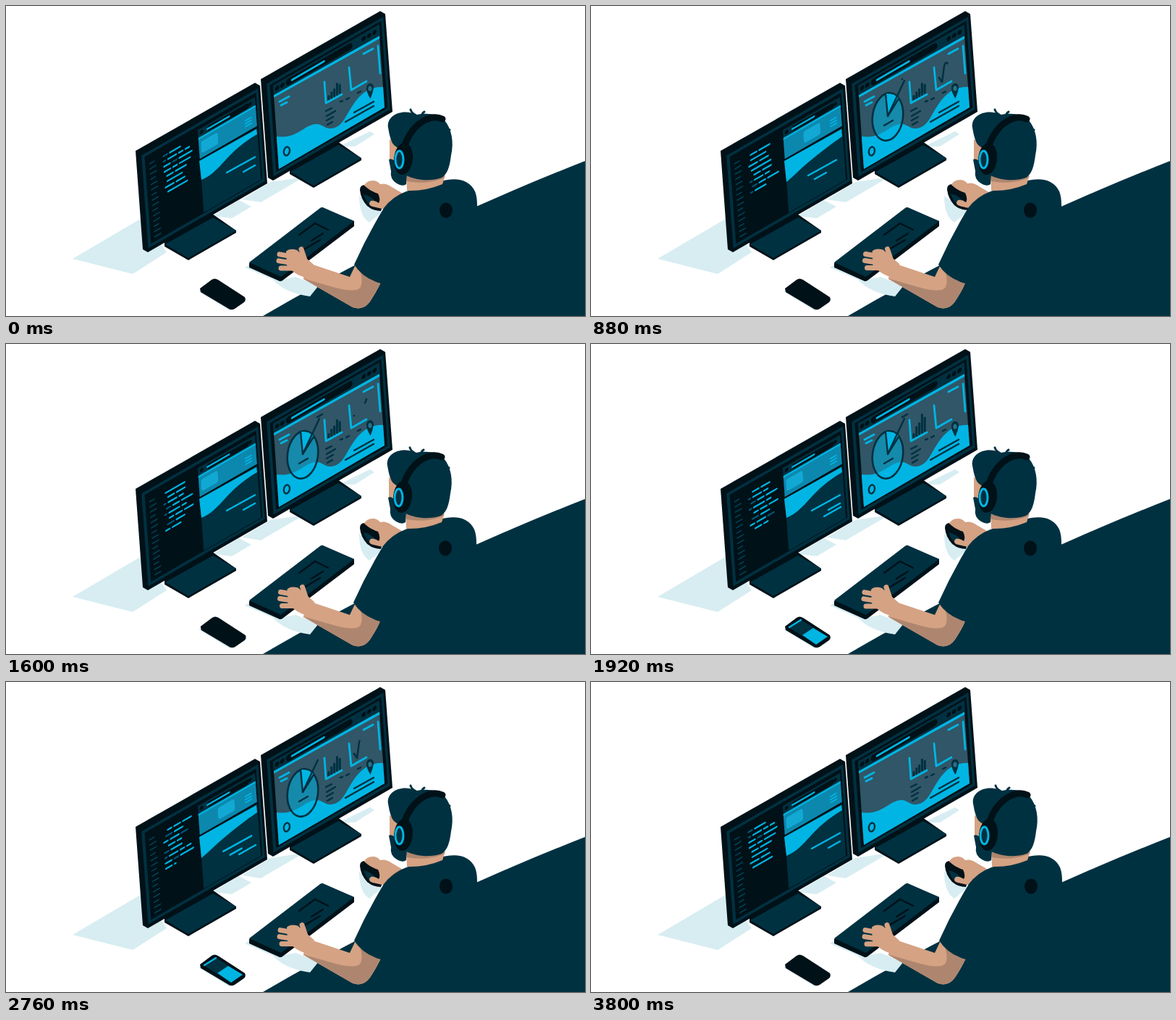
Recreate the animation shown at these times as an HTML page. Size 800x428 px, loop 3.84 s.

```html
<!DOCTYPE html>
<html lang="en">
<head>
<meta charset="utf-8">
<title>Developer at a desk</title>
<style>
  html, body { margin: 0; width: 100%; height: 100%; overflow: hidden; background: #fff; }
  svg { display: block; width: 800px; height: 428px; }
  .ink { fill: #001118; }
  .navy { fill: #003141; }
  .cyan { fill: #00b5e3; }
  .blue { fill: #0c88ae; }
  .pale { fill: #d7edf2; }
  .skin { fill: #d5a283; }
  .shade { fill: #ae866f; }
  .line { fill: none; stroke-linecap: round; stroke-linejoin: round; stroke-width: 2.4; }
  .s-ink { stroke: #001118; }
  .s-navy { stroke: #003141; }
  .s-cyan { stroke: #00b5e3; }
  .s-dim { stroke: #00597a; }
  .s-skin { stroke: #d5a283; }
</style>
</head>
<body>
<svg viewBox="0 0 800 428">
  <defs>
    <g id="monitor">
      <path class="ink" d="M-7-4 158-98 165-94 175 41 10 136 3 132Z"/>
      <g transform="matrix(1 -.575 .0735 1 0 0)">
        <path class="navy" d="M1 3H162V131H1Z"/>
        <path class="ink" d="M5 7H159V127H5Z"/>
      </g>
    </g>
    <g id="stand">
      <path class="ink" d="M0 34 66-4 99 19V22L33 60 0 41Z"/>
      <path class="navy" d="M1 38 67 1 99 19 33 57Z"/>
    </g>
    <clipPath id="screen"><path d="M370 123 516 41 523 140 377 225Z"/></clipPath>
    <clipPath id="editor"><path d="M24 15H77V82H24Z"/></clipPath>
  </defs>

  <path class="navy" d="M355 428Q560 308 800 214V428Z"/>
  <path class="pale" d="M92 349 189 292 222 340 175 370ZM285 290 322 268 339 277 312 293ZM326 267 365 243 412 236 352 271ZM460 194 503 173 509 177 482 194Z"/>
  <path class="pale" d="M330 361 350 349 380 378 400 374 432 386 420 401Q385 396 369 378ZM488 262Q488 290 502 299L520 284ZM266 394 276 389 314 419 308 420Z"/>

  <!-- Right monitor -->
  <use href="#stand" x="392" y="191"/>
  <use href="#monitor" x="359" y="105"/>
  <g transform="matrix(1 -.575 .0735 1 359 105)">
    <path class="navy" d="M9 10H156V25H9Z"/>
    <path class="line s-ink" style="stroke-width:9" d="M31 17H114"/>
    <path class="line s-cyan" style="stroke-width:3" d="M35 17H79"/>
    <path class="line s-ink" style="stroke-width:6" d="M14.500 16.500v.1M21.500 16.500v.1M134 17v.1M141.500 17v.1M149 17v.1"/>
  </g>
  <g clip-path="url(#screen)">
    <path fill="#305667" d="M360 0H530V240H360Z"/>
    <path class="cyan" d="M368 179C403 187 412 161 431 163C439 165 442 170 450 169C457 168 463 164 469 154C478 139 486 122 503 115Q512 111 525 112V150L370 240Z"/>
    <path class="line s-cyan" style="stroke-width:3.500" d="M369 125 518 42"/>
  </g>
  <path class="line s-cyan" style="stroke-width:2.800" d="M378 132 391 125M380 137 388 133M440 105 442 134 464 122M474 85 477 116 498 104M494 66 507 59M514 55 517 93"/>
  <path class="line s-navy" d="M442 145 450 141M443 152 455 145M443 158 452 153M444 164 451 160M462 132 465 131M470 129 474 127M486 120 490 118M469 160 508 138M481 147 508 132"/>
  <ellipse class="line s-navy" cx="388" cy="200.500" rx="4" ry="6" transform="rotate(12 388 200)"/>
  <path id="bars" class="line s-navy" style="stroke-width:3"/>
  <path id="spark" class="line s-navy" pathLength="100" d="M481 99 485 105 488 83Q490 75 493 80T498 76"/>
  <g id="pin">
    <path class="navy" d="M498 115C497 105 508 104 508 113Q507 120 503.500 128Q499 121 498 115Z"/>
    <ellipse cx="503" cy="114" rx="2.600" ry="3.500" fill="#2b7089"/>
  </g>
  <g id="pie">
    <ellipse class="cyan s-navy" fill-opacity=".55" stroke-width="2.600" rx="21" ry="33" transform="rotate(8)"/>
    <path class="cyan" d="M0-1-3-32Q8-33 15-26Z"/>
    <path class="line s-navy" d="M-3-32 0-1 15-25M-5 12 7 5"/>
  </g>
  <path id="pointer" class="line s-navy" pathLength="100" d="M410 152 433 103"/>
  <path id="label" class="line s-navy" pathLength="100" d="M430 101 437 97"/>

  <!-- Left monitor -->
  <use href="#stand" x="219" y="291"/>
  <use href="#monitor" x="186" y="204"/>
  <g transform="matrix(1 -.575 .0735 1 186 204)">
    <path id="numbers" class="line" style="stroke-width:2" stroke="#003d50"/>
    <g clip-path="url(#editor)">
      <path id="dim" class="line s-dim"/>
      <path id="code" class="line s-cyan"/>
    </g>
    <path class="navy" d="M78 12H157V126H78Z"/>
    <path class="line s-ink" style="stroke-width:7" d="M94 18H145"/>
    <path class="line s-ink" style="stroke-width:5" d="M83 17.500v.1M150 17.500v.1"/>
    <path class="line s-cyan" d="M91 18H121"/>
    <path class="blue" d="M78 24H157V52H78Z"/>
    <path class="cyan" d="M78 23H157V25.500H78Z"/>
    <rect id="card" x="81" y="30" width="23" height="16" rx="3" fill="#12a8d4"/>
    <path class="line s-cyan" style="stroke-width:1.800" d="M142 36H150M142 40H150M142 44H150"/>
    <path class="ink" d="M78 52H157V54.500H78Z"/>
  </g>
  <path id="hero" class="cyan"/>
  <path id="copy" class="line s-cyan"/>

  <!-- Keyboard and phone -->
  <path class="ink" d="M336 355 436 278 481 297V304L382 379Q379 381 376 379L336 361Z"/>
  <path class="navy" d="M336 354 434 279Q437 277 440 279L481 297 380 374Z"/>
  <path class="line s-ink" d="M405 316 427 300 445 309M422 324 438 314M412 336 434 323"/>
  <g id="phone">
    <path class="ink" d="M268 390 284 378Q288 375 293 378L330 402Q332 406 329 409L316 418Q311 421 306 417L269 395Z"/>
    <g id="display">
      <path class="navy" d="M273 391 289 380 308 392 292 403Z"/>
      <path class="line s-cyan" d="M274 391 290 381"/>
      <path class="cyan" d="M292 402 307 392 327 404 311 415Z"/>
    </g>
  </g>

  <!-- Mouse and right hand -->
  <g id="mouse">
    <path class="ink" d="M489 254Q489 247 496 247L517 256 522 272 518 283Q507 283 499 276Q490 266 489 254Z"/>
    <path class="navy" d="M494 260Q504 262 511 270L504 276Q497 270 494 260Z"/>
    <path class="skin" d="M495 248Q498 241 507 241Q513 241 517 246Q525 244 533 250L552 261 532 286 520 280Q509 278 504 276Q500 273 504 269Q510 268 515 272Q518 267 514 259Q505 256 500 252Z"/>
  </g>

  <!-- Left arm -->
  <g id="hand">
    <path class="skin" d="M387 339Q392 334 402 337L425 357 418 376Q404 373 396 366L388 358Z"/>
    <path class="line s-skin" style="stroke-width:7" d="M378 343 395 346M377 352 396 355M380 362 398 362M408 336 414 354"/>
  </g>
  <path class="skin" d="M414 352 424 357 475 374 484 355 520 378Q510 398 503 408Q494 421 479 416L411 377Z"/>
  <path class="shade" d="M410 376 452 388Q484 397 490 388Q494 378 488 363L520 378 503 408Q494 421 479 416Z"/>

  <!-- Torso and head -->
  <g id="body">
    <path class="navy" d="M481 357Q499 317 522 279Q534 263 553 256L604 241Q637 234 648 256Q651 263 651 276L690 428H500L518 383Q493 376 481 357Z"/>
    <path class="skin" d="M553 230 607 234 603 246Q579 256 554 255Z"/>
    <path class="shade" d="M553 234 606 235 604 238Q580 247 554 242Z"/>
    <ellipse class="ink" cx="608" cy="282" rx="9" ry="10.500"/>
    <path class="skin" d="M530 184 546 194 541 216 530 213Z"/>
    <path class="navy" d="M529 212Q533 210 537 214L554 230 553 246Q548 250 540 245Q530 239 532 228Z"/>
    <path class="navy" d="M528 168C526 155 538 146 553 146.500Q562 147 568 150C580 147 600 149 606 158C616 170 619 188 615 206C613 222 610 232 602 237C585 243 565 240 553 234L549 202 536 192Q531 187 528 168Z"/>
    <path class="line s-navy" style="stroke-width:3" d="M565 150Q560 147 559 143M575 150Q575 148 578 146M607 173 613 171"/>
    <path class="line s-ink" style="stroke-width:9" d="M550 196C555 177 567 163 580 157Q592 151 603 156"/>
    <ellipse class="ink" cx="549" cy="211" rx="13" ry="22" transform="rotate(6 549 211)"/>
    <ellipse class="navy s-cyan" stroke-width="3" cx="543.500" cy="212" rx="5.500" ry="12"/>
  </g>
</svg>
<script>
const LOOP = 3840, ROW_TIME = 240, ROW_GAP = 7.2, CHAR = 3;
const $ = id => document.getElementById(id);
const clamp = x => Math.min(1, Math.max(0, x));
const linear = (t, a, b) => clamp((t - a) / (b - a));
const ease = (t, a, b) => { const x = linear(t, a, b); return x * x * (3 - 2 * x); };
const pulse = (t, a, b, c, d) => ease(t, a, b) - ease(t, c, d);
const mix = (a, b, k) => a + (b - a) * k;
const set = (id, name, value) => $(id).setAttribute(name, value);
const move = (id, x, y) => set(id, 'transform', `translate(${x} ${y})`);
const show = (id, on) => { $(id).style.display = on ? '' : 'none'; };

// "#" is bright code, "+" is dim code
const rows = [
  '  ### ####', '+ #### ##', ' ++ ### #####', '+ ##### ##', '  ## ### ####', ' +++ ####',
  '## #### +++', '  ### ##', '++ #####', '+ #### ## ##', '### ++ ######', '### ## #####',
  ' ### #####', ' ####### ', '#### ####', ' #########'
];

function dash(id, from, to) {
  show(id, to - from > .01);
  set(id, 'stroke-dasharray', `0 ${from * 100} ${(to - from) * 100} 200`);
}

function drawCode(t) {
  const clock = t / ROW_TIME + 15.8, last = Math.floor(clock), part = clock - last;
  const lift = ease(part, .85, 1) * ROW_GAP;
  const paths = { '#': '', '+': '' };
  for (let back = 0; back < 8; back++) {
    const text = rows[(last - back) % rows.length];
    const limit = back ? 99 : 14 * linear(part, 0, .9);
    const y = 71 - back * ROW_GAP - lift;
    for (const run of text.matchAll(/#+|\++/g)) {
      const end = Math.min(run.index + run[0].length, limit);
      if (end > run.index + .4)
        paths[run[0][0]] += `M${30 + run.index * CHAR} ${y}H${29 + end * CHAR}`;
    }
  }
  set('code', 'd', paths['#']);
  set('dim', 'd', paths['+']);
  let numbers = '';
  for (let i = 0; i < 15; i++) numbers += `M11 ${20 + i * ROW_GAP - lift * .2}h${i % 3 ? 8 : 6}`;
  set('numbers', 'd', numbers);
}

function drawPage(t) {
  const half = t % 1920, k = pulse(half, 540, 880, 1280, 1480);
  move('card', 24 * k, 0);
  const y = mix(177, 180, k);
  set('hero', 'd', `M267 214 346 170 347 ${y}C${mix(325, 330, k)} ${mix(190, 192, k)} ${mix(314, 318, k)} 201 ` +
    `${mix(303, 300, k)} ${mix(213, 216, k)}C${mix(293, 290, k)} 224 ${mix(283, 280, k)} 235 270 ${mix(240, 243, k)}Z`);
  const x1 = mix(305, 300, k), x2 = mix(328, 309, k);
  let copy = `M${x1} ${mix(230, 234, k)}l39-21.500M${x2} ${mix(229, 239, k)}l16-9`;
  const extra = pulse(t, 1700, 1900, 2800, 3000);
  if (extra > .02) copy += `M322 238l${23 * extra} ${-13 * extra}`;
  set('copy', 'd', copy);
}

function drawCharts(t) {
  const half = t % 1920;
  const size = pulse(t, 40, 560, 3160, 3640);
  show('pie', size > .01);
  set('pie', 'transform', `translate(410 153) scale(${size})`);
  dash('pointer', 0, pulse(t, 260, 560, 2700, 3020));
  dash('label', 0, pulse(t, 860, 1120, 2440, 2740));
  dash('spark', linear(half, 900, 1700), ease(half, 600, 1000));
  const tall = 1 + .65 * pulse(t, 1480, 1900, 2300, 3100);
  set('bars', 'd', [4, 7, 9, 15, 11].map((h, i) =>
    `M${446 + i * 3.8} ${128.500 - i * 2.1}v${-h * (i ? tall : 1)}`).join(''));
  move('pin', 0, Math.cos(t / 960 * 2 * Math.PI) - 1);
}

function draw(t) {
  drawCode(t);
  drawPage(t);
  drawCharts(t);
  show('display', t >= 1640 && t < 3560);
  move('phone', t > 1560 && t < 1880 ? .8 * Math.sin(t / 25) : 0, 0);
  const tap = (1 - Math.cos((t - 40) / ROW_TIME * 2 * Math.PI)) / 2;
  move('hand', 2 * tap - .5, -.5 * tap);
  const slide = pulse(t, 500, 860, 940, 1240);
  move('mouse', 3 * slide, -slide);
  move('body', -pulse(t, 100, 700, 2200, 2800), 0);
}

function frame() {
  draw(performance.now() % LOOP);
  requestAnimationFrame(frame);
}
frame();
</script>
</body>
</html>
```
